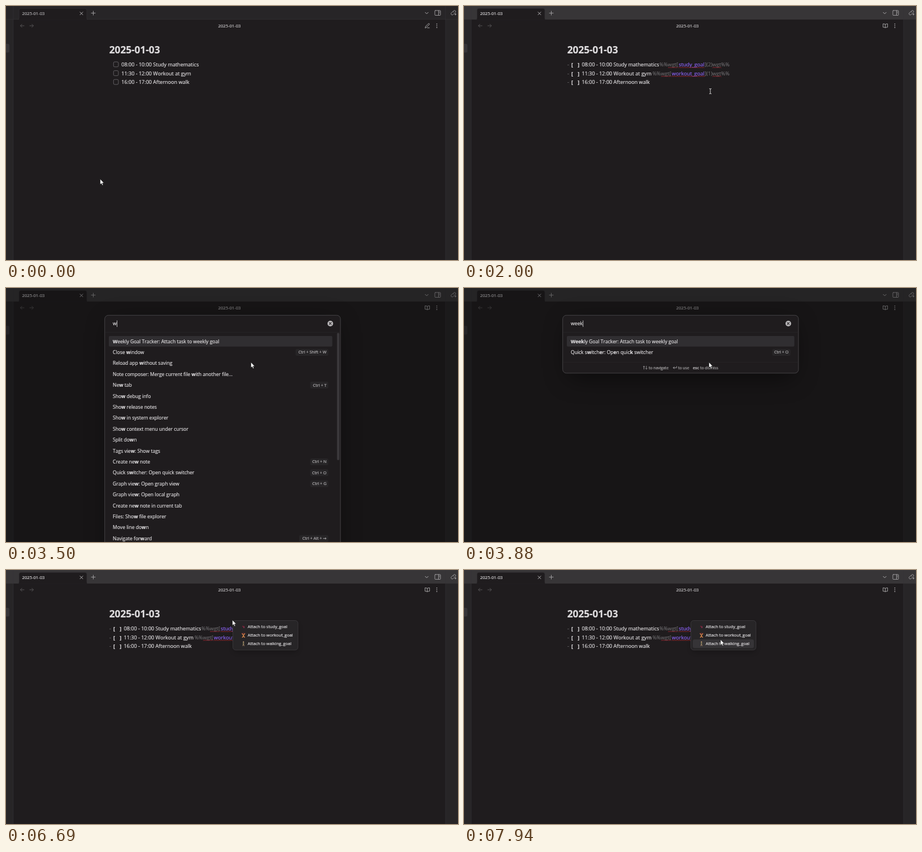
Recreate the animation shown at these times as an HTML page. Size 800 by 450 pixels, loop 8000 ms.

```html
<!DOCTYPE html>
<html lang="en">
<head>
<meta charset="utf-8">
<title>Daily note</title>
<style>
  html, body { margin: 0; width: 100%; height: 100%; overflow: hidden; background: #1f1c1e; }
  svg { display: block; width: 100%; height: 100%; font-family: "Open Sans", "Noto Sans", "DejaVu Sans", sans-serif; }
  text { white-space: pre; font-kerning: none; stroke-width: .2; }
  .icon { fill: none; stroke-linecap: round; stroke-linejoin: round; }
</style>
</head>
<body>
<svg id="stage" viewBox="0 0 800 450"></svg>
<script>
const LOOP = 8000;
const FOCUS = 940, EDIT = 1200, OPEN = 2720, CLOSE = 6060;
const TYPING = [[3440, 'w'], [3560, 'we'], [3690, 'wee'], [3810, 'week'], [4030, 'weekl'], [4180, 'weekly']];

// Pointer legs: start, end, destination
const START = [166.7, 306.5];
const LEGS = [
  [60, 740, 434.5, 151],
  [2300, 2700, 433.5, 131.5],
  [4750, 5420, 400.7, 88.5],
  [6880, 7580, 452, 128],
  [7690, 7900, 454, 123.2]
];

const COMMANDS = [
  ['Weekly Goal Tracker: Attach task to weekly goal'],
  ['Close window', 'Ctrl + Shift + W'],
  ['Reload app without saving'],
  ['Note composer: Merge current file with another file...'],
  ['New tab', 'Ctrl + T'],
  ['Show debug info'],
  ['Show release notes'],
  ['Show in system explorer'],
  ['Show context menu under cursor'],
  ['Split down'],
  ['Tags view: Show tags'],
  ['Create new note', 'Ctrl + N'],
  ['Quick switcher: Open quick switcher', 'Ctrl + O'],
  ['Graph view: Open graph view', 'Ctrl + G'],
  ['Graph view: Open local graph'],
  ['Create new note in current tab'],
  ['Files: Show file explorer'],
  ['Move line down'],
  ['Navigate forward', 'Ctrl + Alt + →']
];
const TASKS = ['08:00 - 10:00 Study mathematics', '11:30 - 12:00 Workout at gym', '16:00 - 17:00 Afternoon walk'];
const GOALS = ['study_goal', 'workout_goal', 'walking_goal'];
const PAGE = '#1f1c1e', SIDE = '#272527', LINE = '#363437';
const TEXT = '#dedcde', MUTED = '#b3b1b3', FAINT = '#666467';

// cy is the middle of the capitals; the thin stroke firms up small type
const txt = (x, cy, size, str, fill = TEXT, more = '') =>
  `<text x="${x}" y="${cy + size * .357}" font-size="${size}" fill="${fill}" stroke="${fill}" ${more}>${str}</text>`;
const rect = (x, y, w, h, fill, more = '') =>
  `<rect x="${x}" y="${y}" width="${w}" height="${h}" fill="${fill}" ${more}/>`;
const icon = (d, color = MUTED, width = 1, more = '') =>
  `<path class="icon" d="${d}" stroke="${color}" stroke-width="${width}" ${more}/>`;
const group = (id, body) => `<g id="${id}">${body}</g>`;

const rowY = i => 104 + i * 15.6;

function wave(x, end, y) {
  let d = `M${x} ${y}`;
  for (let i = 0; x < end; i++, x += 1.5) d += `l1.5 ${i % 2 ? 1 : -1}`;
  return icon(d, '#b02a35', .8);
}

function bars() {
  return rect(0, 0, 800, 450, PAGE) +
    rect(0, 24, 13, 426, SIDE) + rect(778, 24, 22, 426, SIDE) +
    '<rect id="strip" width="800" height="24"/>' +
    rect(0, 23.5, 800, .6, LINE) + rect(12.6, 0, .6, 450, LINE) + rect(777.6, 0, .6, 450, LINE) +
    `<path d="M20 24.5Q23 24.5 23 21.5V7.5Q23 4.2 26.5 4.2H139.5Q143 4.2 143 7.5V21.5Q143 24.5 146 24.5Z" fill="${PAGE}" stroke="${LINE}" stroke-width=".6"/>` +
    rect(19, 24.2, 128, 1, PAGE) +
    rect(-3, 67, 9, 15.5, LINE, 'rx="2.5"') +
    txt(28.5, 13.4, 7.66, '2025-01-03', MUTED, 'id="tab"') +
    icon('M131 10.7l5 5m0-5l-5 5') +
    icon('M151 12.6h7m-3.5-3.5v7', '#a09ea0') +
    icon('M742 11.3l2.6 2.6 2.6-2.6') +
    icon('M760 8h8q1 0 1 1v6.5q0 1-1 1h-8q-1 0-1-1v-6.5q0-1 1-1zM765.5 8v8.5M767 10.3h.6m-.6 2h.6', '#a5a3a5', .9) +
    icon('M791 9.8l1.3-1.3a2 2 0 0 1 3 3l-1.5 1.5M792.8 13.7l-1.5 1.5a2 2 0 0 1-3-3l1.5-1.5a2 2 0 0 1 3 0M794 14.6h2.8m-1.3-1.3v2.8', '#a5a3a5', .9) +
    icon('M32 35h-6.5m2.8-2.8l-2.8 2.8 2.8 2.8M42 35h6.5m-2.8-2.8l2.8 2.8-2.8 2.8', '#555355') +
    txt(395.5, 35.2, 7.66, '2025-01-03', '#c8c6c8', 'text-anchor="middle"') +
    [31.8, 35, 38.2].map(y => `<circle cx="762.5" cy="${y}" r=".85" fill="${MUTED}"/>`).join('') +
    txt(182.7, 77.5, 17.25, '2025-01-03', TEXT, 'font-weight="700"');
}

function reading() {
  return icon('M742 38.7l.6-2.5 5-5q.8-.6 1.5.1t.1 1.5l-5 5zM745.8 38.7h3.5', MUTED, .9) +
    TASKS.map((s, i) =>
      rect(190.3, rowY(i) - 5, 8.6, 8.8, 'none', 'rx="2" stroke="#69676a" stroke-width=".9"') +
      txt(204.3, rowY(i) - .1, 9.04, s)).join('');
}

function editing() {
  // start of the mark, start of its goal, amount
  const marks = [[346, 380, 2], [333.7, 367.8, 1]];
  return icon('M745.7 32.5q-1.5-1-4-.9v6q2.5-.1 4 .9 1.5-1 4-.9v-6q-2.5-.1-4 .9v6', MUTED, .9) +
    TASKS.map((s, i) => {
      const y = rowY(i) - .2;
      let out = txt(183, y, 9, '-', FAINT) +
        txt(190, y, 9, '[', TEXT, 'font-weight="700"') + txt(201.3, y, 9, ']', TEXT, 'font-weight="700"') +
        txt(208.5, y, 9.04, s);
      if (marks[i]) {
        const [a, b, n] = marks[i];
        out += txt(a, y, 9.04, '%%wgt[', FAINT) + txt(b, y, 9.2, GOALS[i], '#8a62f2') +
          txt(426, y, 9.15, `](${n})wgt%%`, FAINT) +
          wave(a + 15.5, a + 31, y + 5.7) + wave(b, 425, y + 5.7) + wave(440, 455, y + 5.7);
      }
      return out;
    }).join('');
}

function menu() {
  return rect(403, 95, 113, 50, '#000', 'rx="6" opacity=".25" filter="url(#soft)"') +
    rect(401.5, 89.5, 115.3, 52.3, '#272527', 'rx="5" stroke="#3f3d40" stroke-width=".8"') +
    rect(405, 93, 108, 15.1, LINE, 'id="hover" rx="3"') +
    GOALS.map((g, i) => txt(427.7, 100.8 + i * 15, 7.45, 'Attach to ' + g)).join('') +
    // small pictograms: satchel, lifter, walker
    '<path d="M417.7 99.5l1.6-1 1.5 1.2 1.2-.6v3.8l-1.5.3-1-1.8z" fill="#6d2434"/><path d="M420.5 100.3l1.7.5-.5 2.2z" fill="#94406a"/>' +
    icon('M418 112.8l2.3 3 2.3-3M420.3 115.5v1.5l-2 2.3m2-2.3l2 2.3', '#e08a4c', 1.3) +
    icon('M417.6 112.3h5.4', '#a9443c', .8) +
    '<circle cx="420.3" cy="127.6" r="1" fill="#e0b184"/>' +
    icon('M420.3 129v2.5', '#7f7a58', 2) +
    icon('M420.3 131.5l-1.2 2.8m1.2-2.8l1.2 2.8', '#a98a6a');
}

// Greedy subsequence match; returns markup with the hits in bold, or null
function match(name, query) {
  let k = 0;
  const out = [...name].map(c =>
    k < query.length && c.toLowerCase() === query[k] ? (k++, `<tspan font-weight="700">${c}</tspan>`) : c);
  return k === query.length ? out.join('').replaceAll('</tspan><tspan font-weight="700">', '') : null;
}

function footer(y) {
  const c = '#aaa8aa';
  return icon(`M318.5 ${y + 2.5}v-5.5m-1.3 1.3l1.3-1.3 1.3 1.3M322.8 ${y - 3}v5.5m-1.3-1.3l1.3 1.3 1.3-1.3`, c, .8) +
    txt(327, y, 6.8, 'to navigate', c) +
    icon(`M376.3 ${y - 2.5}v2.5h-6m1.8-1.8l-1.8 1.8 1.8 1.8`, c, .9) +
    txt(379, y, 6.8, 'to use', c) +
    txt(405, y, 6.8, 'esc', c, 'font-weight="700"') + txt(418, y, 6.8, 'to dismiss', c);
}

function palette(query) {
  const rows = COMMANDS.map(([name, keys]) => [match(name, query), keys]).filter(r => r[0]);
  const long = rows.length > 17;
  const right = long ? 577.5 : 584.7;
  const bottom = 112 + rows.length * 19.42 + (long ? 40 : 0);
  let out = rect(185, 62, 398, bottom - 54, '#000', 'rx="8" opacity=".5" filter="url(#wide)"') +
    rect(174.7, 48.3, 417.3, bottom - 48.3, PAGE, 'rx="6.5" stroke="#4a484b" stroke-width=".9"') +
    rect(175.2, 78, 416.3, .6, '#2a282a') +
    txt(189, 63.2, 8.7, query, TEXT, 'id="query"') + rect(189, 57.5, .8, 11.5, '#e4e4e4', 'id="caret"') +
    rect(182, 85, right - 182, 18.8, '#302e31', 'rx="2"');
  if (query) {
    out += '<circle cx="574" cy="63" r="5" fill="#b9b7b9"/>' +
      icon('M572.2 61.2l3.6 3.6m0-3.6l-3.6 3.6', PAGE, 1.2);
  }
  rows.forEach(([name, keys], i) => {
    const y = 94.5 + i * 19.4;
    out += txt(189, y, 8.54, name);
    if (keys) {
      const w = keys.length * 3.25 + 6;
      out += rect(right - 7 - w, y - 6, w, 12, SIDE, 'rx="2.5"') +
        txt(right - 10.3, y, 7.25, keys, MUTED, 'text-anchor="end"');
    }
  });
  if (long) out += rect(585.8, 79.5, 4.2, 225.5, '#3a383b', 'rx="2"');
  else out += rect(175.2, bottom - 19.5, 416.3, .6, '#2a282a') + footer(bottom - 9.5);
  return out;
}

const $ = id => document.getElementById(id);
$('stage').innerHTML =
  '<defs><filter id="soft" x="-30%" y="-60%" width="160%" height="220%"><feGaussianBlur stdDeviation="5"/></filter>' +
  '<filter id="wide" x="-30%" y="-100%" width="160%" height="300%"><feGaussianBlur stdDeviation="22"/></filter></defs>' +
  bars() + group('read', reading()) + group('edit', editing()) +
  rect(0, 0, 800, 450, '#0a0a0a', 'id="cover" opacity=".4"') + group('palette', '') + group('menu', menu()) +
  '<path id="arrow" d="M0 0V9.8L2.2 7.8 3.7 11.2 5.3 10.5 3.8 7.2H6.8Z" fill="#fff" stroke="#111" stroke-width=".6"/>' +
  icon('M-1.6-4.6Q0-4.6 0-3.6 0-4.6 1.6-4.6M0-3.6V3.6M-1.6 4.6Q0 4.6 0 3.6 0 4.6 1.6 4.6', '#d2d2d2', 1, 'id="beam"');

const show = (id, on) => $(id).style.display = on ? '' : 'none';
const ease = p => p * p * (3 - 2 * p);

function pointer(t) {
  let [x, y] = START;
  for (const [a, b, tx, ty] of LEGS) {
    const p = ease(Math.min(1, Math.max(0, (t - a) / (b - a))));
    x += (tx - x) * p;
    y += (ty - y) * p;
  }
  return [x, y];
}

let shown = null;
function draw(t) {
  const edit = t >= EDIT, open = t >= OPEN && t < CLOSE, focus = t >= FOCUS, picking = t >= CLOSE;
  $('strip').setAttribute('fill', focus ? '#373537' : SIDE);
  for (const key of ['fill', 'stroke']) $('tab').setAttribute(key, focus ? '#d8d6d8' : MUTED);
  show('read', !edit);
  show('edit', edit);
  show('cover', open);
  show('palette', open);
  show('menu', picking);

  if (open) {
    const query = TYPING.reduce((q, [at, s]) => t >= at ? s : q, '');
    if (query !== shown) {
      $('palette').innerHTML = palette(query);
      $('caret').setAttribute('x', 189.3 + (query ? $('query').getComputedTextLength() : 0));
      shown = query;
    }
  }

  const [x, y] = pointer(t);
  const row = Math.floor((y - 93) / 15.05);
  show('hover', x > 405 && row >= 0 && row < 3);
  $('hover').setAttribute('y', 93 + row * 15.05);

  const beam = edit && t < OPEN;
  show('beam', beam);
  show('arrow', !beam);
  $('arrow').setAttribute('transform', `translate(${x} ${y})`);
  $('beam').setAttribute('transform', `translate(${x + 1.5} ${y})`);
}

const begin = performance.now();
function tick() {
  draw((performance.now() - begin) % LOOP);
  requestAnimationFrame(tick);
}
tick();
</script>
</body>
</html>
```
